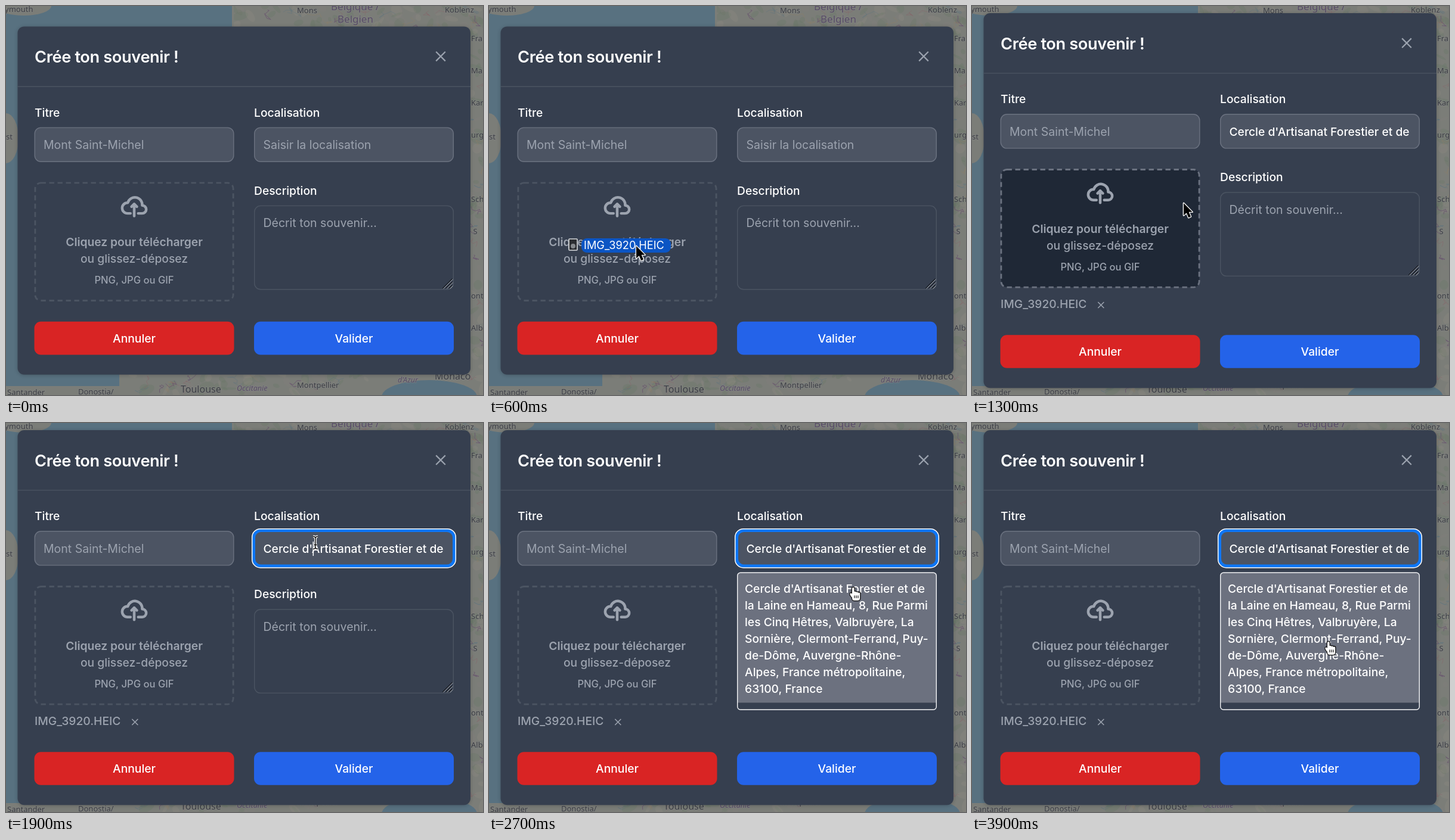
An HTML page with a canvas for the animation above (4.1 s loop, 800x653 px).

```html
<!DOCTYPE html>
<html lang="fr">
<head>
<meta charset="utf-8">
<title>Crée ton souvenir</title>
<style>
html, body { margin: 0; width: 800px; height: 653px; overflow: hidden; background: #7b7d78; }
canvas { display: block; }
</style>
</head>
<body>
<canvas id="stage" width="800" height="653"></canvas>
<script>
const ctx = document.getElementById('stage').getContext('2d');
const W = 800, H = 653, LOOP = 4100, STEP = 100;
const LEFT = 47.5, RIGHT = 416, COLUMN = 335, RADIUS = 11, LEADING = 28, GROW = 22.4;
const UI = 'Inter, "Noto Sans", sans-serif';
const MAP = '"Noto Sans", sans-serif';
const C = {
  panel: '#363f4f', line: '#4b5462', field: '#4c5463', edge: '#6b7280', muted: '#9ca3af',
  hover: '#1f2836', red: '#d92424', blue: '#2463e9', focus: '#0d76f5', item: '#6c717f',
  sea: '#587180', land: '#7b7d78', border: '#6c5b70', ink: '#3c3e44', country: '#584c66'
};

const FILE = 'IMG_3920.HEIC';
const ADDRESS = [
  "Cercle d'Artisanat Forestier et de",
  'la Laine en Hameau, 8, Rue Parmi',
  'les Cinq Hêtres, Valbruyère, La',
  'Sornière, Clermont-Ferrand, Puy-',
  'de-Dôme, Auvergne-Rhône-',
  'Alpes, France métropolitaine,',
  '63100, France'
];

// Moments of the scenario, in ms
const AT = { enter: 100, drop: 900, listed: 1000, located: 1100, leave: 1400, ibeam: 1600, focus: 1900, open: 2200 };

const easeOut = k => 1 - (1 - k) ** 2;
const smooth = k => k * k * (3 - 2 * k);
const linear = k => k;

// The pointer rests between moves; sway swings it right, then left
const START = { x: 690, y: 640 };
const MOVES = [
  { from: 100, to: 600, x: 247, y: 403, ease: easeOut },
  { from: 800, to: 1300, x: 355, y: 331, ease: smooth },
  { from: 1300, to: 1800, x: 519, y: 201, ease: smooth },
  { from: 2200, to: 2700, x: 606, y: 277, ease: smooth },
  { from: 2700, to: 3500, x: 565, y: 393, ease: linear, sway: 77 },
  { from: 3500, to: 3900, x: 593, y: 368, ease: easeOut }
];

function pointerAt(t) {
  let { x, y } = START;
  for (const move of MOVES) {
    if (t < move.from) break;
    const k = Math.min(1, (t - move.from) / (move.to - move.from));
    const e = move.ease(k);
    x += (move.x - x) * e + (move.sway || 0) * Math.sin(2 * Math.PI * k);
    y += (move.y - y) * e;
  }
  return [x, y];
}

function random(seed) {
  return () => (seed = (seed * 16807) % 2147483647) / 2147483647;
}

function text(str, x, y, { size = 19.25, weight = 500, color = '#fff', align = 'left', track = 0, family = UI, style = '' } = {}) {
  ctx.font = `${style} ${weight} ${size}px ${family}`;
  ctx.letterSpacing = track + 'px';
  ctx.textAlign = align;
  ctx.fillStyle = color;
  ctx.fillText(str, x, y);
}

function box(x, y, w, h, r, fill, stroke, width = 1.4, dash = []) {
  ctx.beginPath();
  ctx.roundRect(x, y, w, h, r);
  if (fill) { ctx.fillStyle = fill; ctx.fill(); }
  if (stroke) {
    ctx.strokeStyle = stroke;
    ctx.lineWidth = width;
    ctx.setLineDash(dash);
    ctx.stroke();
    ctx.setLineDash([]);
  }
}

// A box whose border lies inside its edge
function bordered(x, y, w, h, fill, stroke, width = 1.4, dash) {
  box(x + width / 2, y + width / 2, w - width, h - width, RADIUS - width / 2, fill, stroke, width, dash);
}

function line(x1, y1, x2, y2, color, width) {
  ctx.beginPath();
  ctx.moveTo(x1, y1);
  ctx.lineTo(x2, y2);
  ctx.strokeStyle = color;
  ctx.lineWidth = width;
  ctx.stroke();
}

function blob(x, y, rx, ry, color, turn = 0) {
  ctx.beginPath();
  ctx.ellipse(x, y, rx, ry, turn, 0, 2 * Math.PI);
  ctx.fillStyle = color;
  ctx.fill();
}

function cross(x, y, r, width) {
  line(x - r, y - r, x + r, y + r, C.muted, width);
  line(x + r, y - r, x - r, y + r, C.muted, width);
}

function shifted(dy, paint) {
  ctx.save();
  ctx.translate(0, dy);
  paint();
  ctx.restore();
}

function label(str, x, y, { size = 13, color = C.ink, style = '' } = {}) {
  ctx.font = `${style} 500 ${size}px ${MAP}`;
  ctx.letterSpacing = '0px';
  ctx.textAlign = 'left';
  ctx.lineJoin = 'round';
  ctx.strokeStyle = 'rgba(134,135,136,.5)';
  ctx.lineWidth = 2;
  ctx.strokeText(str, x, y);
  text(str, x, y, { size, color, style, family: MAP });
}

function drawTerrain(rnd) {
  // One spot in the visible land: top edge, right edge or bottom edge
  const spot = i => [
    [382 + rnd() * 418, rnd() * 36],
    [780 + rnd() * 20, rnd() * H],
    [206 + rnd() * 420, 616 + rnd() * 36]
  ][i % 3];
  const tints = ['rgba(96,116,96,.25)', 'rgba(142,138,128,.3)', 'rgba(100,118,98,.25)', 'rgba(128,126,124,.3)'];
  const roads = ['rgba(138,96,104,.4)', 'rgba(145,125,98,.4)', 'rgba(85,112,128,.35)', C.border];
  for (let i = 0; i < 150; i++) blob(...spot(i), 3 + rnd() * 11, 2 + rnd() * 7, tints[i % 4], rnd() * 3);
  for (let i = 0; i < 60; i++) {
    let [x, y] = spot(i);
    ctx.beginPath();
    for (let k = 0; k < 7; k++) ctx.lineTo(x += rnd() * 18 - 8, y += rnd() * 14 - 7);
    ctx.strokeStyle = roads[i % 4];
    ctx.lineWidth = 1;
    ctx.stroke();
  }
}

function drawMap() {
  ctx.fillStyle = C.land;
  ctx.fillRect(0, 0, W, H);
  ctx.save();
  ctx.beginPath();
  ctx.rect(382, 0, W, H);
  ctx.rect(206, 600, W, H);
  ctx.clip();
  drawTerrain(random(77));
  ctx.restore();

  ctx.fillStyle = C.sea;
  ctx.fillRect(0, 0, 379, 60);
  ctx.fillRect(0, 0, 190, 638);
  blob(710, 656, 80, 28, C.sea);
  blob(30, 0, 46, 16, C.land);
  blob(0, 222, 21, 42, C.land);

  const country = { size: 17, color: C.country };
  const region = { size: 12.5, color: C.country, style: 'italic' };
  const city = { size: 16 };
  label('ymouth', -2, 10);
  label('Mons', 488, 12);
  label('Belgique /', 545, 7, country);
  label('Belgien', 556, 28, country);
  label('Koblenz', 736, 11);
  label('st', 0, 224);
  ['Fran', 'Ma', 'Kar', 'urg', '', 'Sch', ' S', '', 'ont', 'Alb'].forEach((str, i) => label(str, 780, 59 + 54 * i));

  // The southern towns follow the bend of the coast
  const south = (str, x, look) => label(str, x, 653 - (x / 142) ** 2, look);
  south('Santander', 2);
  south('Donostia/', 121);
  south('Toulouse', 293, city);
  south('Occitanie', 387, region);
  south('Montpellier', 488);
  south("d'Azur", 657, region);
  south('Monaco', 719, city);
}

function drawCloud() {
  ctx.save();
  ctx.translate(192.6, 319);
  ctx.scale(2.24, 2.24);
  ctx.lineCap = ctx.lineJoin = 'round';
  const up = -Math.PI / 2, down = Math.PI / 2;
  ctx.beginPath();
  ctx.moveTo(7.2, 13);
  ctx.arc(5, 9, 4, down, up);
  ctx.arc(10.5, 6.5, 5.5, Math.PI + .27, .09);
  ctx.arc(16, 10, 3, up, down);
  ctx.lineTo(13, 13);
  ctx.moveTo(10, 15);
  ctx.lineTo(10, 6);
  ctx.moveTo(8, 8);
  ctx.lineTo(10, 6);
  ctx.lineTo(12, 8);
  ctx.strokeStyle = C.muted;
  ctx.lineWidth = 2;
  ctx.stroke();
  ctx.restore();
}

function drawDropzone(hovered) {
  bordered(LEFT, 295.5, COLUMN, 200.4, hovered ? C.hover : null, hovered ? C.edge : C.line, 2.8, [8.4, 5.6]);
  drawCloud();
  const look = { align: 'center', color: C.muted };
  text('Cliquez pour télécharger', 215, 403, { ...look, weight: 600 });
  text('ou glissez-déposez', 215, 403 + LEADING, look);
  text('PNG, JPG ou GIF', 215, 466, { ...look, size: 16.6 });
}

function placeholder(str, x, y) {
  text(str, x + 15.5, y, { size: 19.5, weight: 400, color: C.muted });
}

function drawLocation(t) {
  const focused = t >= AT.focus;
  bordered(RIGHT, 203.4, COLUMN, 58.6, C.field, C.edge);
  if (focused) {
    box(415.5, 202.9, 336, 59.6, 12, null, C.focus, 5);
    box(412.7, 200.1, 341.6, 65.2, 14, null, '#fff', 1.5);
  }
  if (t < AT.located) return placeholder('Saisir la localisation', RIGHT, 240);
  ctx.save();
  ctx.beginPath();
  ctx.rect(430, 206, 306, 54);
  ctx.clip();
  text(ADDRESS[0] + ' ' + ADDRESS[1], 431.5, 240);
  ctx.restore();
  const caretOn = focused && Math.floor((t - AT.focus) / 550) % 2 === 0;
  if (caretOn) line(515.3, 221.5, 515.3, 245.5, '#fff', 1.5);
}

function drawFields(t) {
  text('Crée ton souvenir !', 48, 95, { size: 27.2, weight: 600, track: -.37 });
  cross(729, 84.6, 7.8, 2.2);
  line(19.5, 135.3, 779, 135.3, C.line, 1.4);
  text('Titre', 48, 185.5);
  text('Localisation', RIGHT, 185.5);
  text('Description', RIGHT, 316.5);
  bordered(LEFT, 203.4, COLUMN, 58.6, C.field, C.edge);
  placeholder('Mont Saint-Michel', LEFT, 240);
  drawLocation(t);
  drawDropzone(t >= AT.drop && t < AT.leave);
  bordered(RIGHT, 334.7, COLUMN, 141.8, null, C.line);
  placeholder('Décrit ton souvenir...', RIGHT, 371);
  for (let d = 16; d > 0; d -= 5.5) {
    line(748.5 - d, 474, 748.5, 474 - d, '#14181f', 1.5);
    line(749.5 - d, 474.6, 749.5, 474.6 - d, '#b9bdc4', 1);
  }
}

function drawButton(str, x, color) {
  box(x, 529.8, COLUMN, 55.6, RADIUS, color);
  text(str, x + COLUMN / 2, 565, { align: 'center' });
}

function drawForm(t) {
  const grow = t >= AT.listed ? GROW : 0;
  ctx.save();
  ctx.shadowColor = 'rgba(0,0,0,.22)';
  ctx.shadowBlur = 6;
  ctx.shadowOffsetY = 1;
  box(19.5, 34.4 - grow, 759.5, 584.4 + 2 * grow, RADIUS, C.panel);
  ctx.restore();
  shifted(-grow, () => drawFields(t));
  if (grow) {
    text(FILE, 48, 507.3, { color: C.muted });
    cross(216.3, 502, 5, 1.6);
  }
  shifted(grow, () => {
    drawButton('Annuler', LEFT, C.red);
    drawButton('Valider', RIGHT, C.blue);
  });
}

function drawSuggestion(hovered) {
  box(RIGHT, 250.5, COLUMN, 231.5, 5, C.panel);
  if (hovered) box(RIGHT + 1, 251.5, COLUMN - 2, 218, [4, 4, 0, 0], C.item);
  box(RIGHT + .7, 251.2, COLUMN - 1.4, 230.1, 5, null, '#f3f4f6');
  ADDRESS.forEach((str, i) => text(str, 429, 284.6 + LEADING * i));
}

function drawDraggedFile(x, y) {
  box(x - 113, y - 12, 14, 19, 1, '#2b2d31', '#d8dadd', 1.6);
  blob(x - 106, y, 4, 4, '#85888c');
  box(x - 92, y - 13, 150, 24, 9, '#0b55c4');
  text(FILE, x - 88, y + 5.3, { size: 18.2, weight: 400 });
}

function outlined(path, fill, stroke, width) {
  ctx.strokeStyle = stroke;
  ctx.lineWidth = width;
  ctx.stroke(path);
  ctx.fillStyle = fill;
  ctx.fill(path);
}

const arrow = new Path2D('M0 0V20.5L4.8 16.2L8.2 24.2L12 22.6L8.6 14.8H14.6Z');
const beam = new Path2D('M-4 -10.5Q0 -10.5 0 -7.5Q0 -10.5 4 -10.5M0 -7.5V7.5M-4 10.5Q0 10.5 0 7.5Q0 10.5 4 10.5M-2.5 3.5H2.5');

function handShape() {
  const hand = new Path2D();
  hand.roundRect(3, -1, 3.6, 14, 1.8);
  for (let i = 1; i < 4; i++) hand.roundRect(3 + 3.2 * i, 5 + .8 * i, 3.6, 10, 1.8);
  hand.roundRect(3, 10, 13.2, 11, 4);
  hand.ellipse(2.6, 12.5, 2, 4.5, -.6, 0, 2 * Math.PI);
  return hand;
}
const hand = handShape();

function drawPointer(t, x, y) {
  ctx.save();
  ctx.translate(x, y);
  ctx.lineJoin = 'round';
  if (t < AT.ibeam) outlined(arrow, '#000', '#fff', 2.6);
  else if (y < 245) {
    ctx.strokeStyle = '#fff';
    ctx.lineWidth = 4;
    ctx.stroke(beam);
    ctx.strokeStyle = '#111';
    ctx.lineWidth = 1.5;
    ctx.stroke(beam);
  } else {
    outlined(hand, '#fff', '#111', 2.6);
    for (let i = 1; i < 4; i++) line(4 + 3 * i, 12.5, 4 + 3 * i, 17, '#111', 1.2);
  }
  ctx.restore();
}

function draw(t) {
  const [x, y] = pointerAt(t);
  drawMap();
  drawForm(t);
  if (t >= AT.open) drawSuggestion(y > 252);
  if (t >= AT.enter && t < AT.drop) drawDraggedFile(x, y);
  if (t >= AT.enter) drawPointer(t, x, y);
}

let last = -1;
function tick() {
  const t = Math.floor(performance.now() % LOOP / STEP) * STEP;
  if (t !== last) draw(last = t);
  requestAnimationFrame(tick);
}
tick();
</script>
</body>
</html>
```
